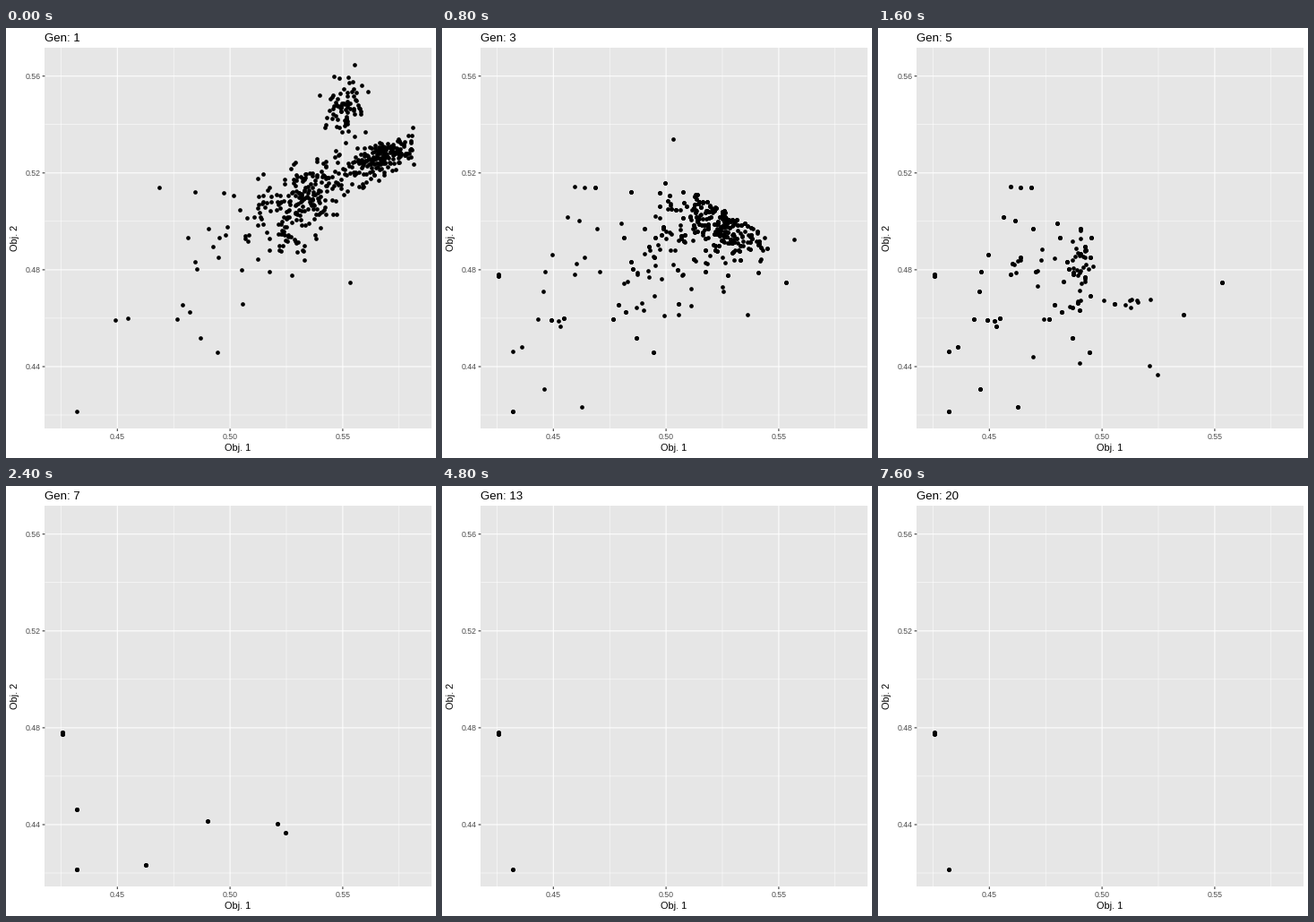
A matplotlib script that plays this animation: 480x480 px, repeating every 8000 ms.

```python
import matplotlib.pyplot as plt
import numpy as np
from matplotlib.animation import FuncAnimation
from matplotlib.patches import Rectangle

SIZE, DPI = 480, 72  # at 72 dpi one point is one pixel
GENERATIONS, INTERVAL = 20, 400
LEFT, RIGHT, TOP, BOTTOM = 43.4, 474.5, 21.8, 447.3
MIN_X, MAX_X, MIN_Y, MAX_Y = 63, 455, 41, 428
FOREVER = 99

plt.rcParams["font.family"] = "Liberation Sans"
rng = np.random.default_rng(7)


def cloud(born, last, count, center, spread, tilt=0.0):
    """Normal scatter around a tilted line, kept inside the data range."""
    dx = rng.normal(0, spread[0], count)
    x = center[0] + dx
    y = center[1] + tilt * dx + rng.normal(0, spread[1], count)
    inside = (x > MIN_X) & (x < MAX_X) & (y > MIN_Y) & (y < MAX_Y)
    return born, last, np.column_stack([x, y])[inside]


def key_points(born, last, *points):
    return born, last, np.array(points, float)


CLOUDS = [
    # first generation
    cloud(1, 1, 75, (380, 90), (12, 17)),
    cloud(1, 1, 190, (422, 144), (20, 9), -0.25),
    cloud(1, 4, 220, (335, 187), (32, 21), -0.4),
    cloud(1, 4, 25, (312, 242), (20, 17)),
    cloud(1, 5, 16, (232, 255), (20, 45), -0.8),
    # offspring moving towards the lower left
    cloud(2, 4, 110, (320, 210), (32, 20), 0.2),
    cloud(3, 4, 70, (320, 222), (25, 12), 0.4),
    cloud(3, 4, 50, (275, 240), (26, 30)),
    cloud(3, 6, 18, (135, 265), (32, 42), -0.6),
    cloud(3, 5, 10, (226, 275), (7, 25)),
    cloud(5, 5, 28, (226, 277), (7, 25)),
    cloud(5, 5, 12, (175, 280), (25, 40)),
    cloud(5, 5, 9, (278, 306), (18, 7)),
]

# Extremes and long-lived individuals on the front.
KEYS = [
    key_points(1, 1, (389, MIN_Y), (MAX_X, 152)),
    key_points(1, 5, (171, 178), (384, 284)),
    key_points(1, 6, (122, 326), (136, 324), (217, 346)),
    key_points(1, FOREVER, (79, MAX_Y)),
    key_points(2, FOREVER, (MIN_X, 276.6), (MIN_X, 275.4)),
    key_points(3, 3, (258, 124), (393, 236)),
    key_points(3, 5, (341, 320)),
    key_points(3, 8, (79, 361), (156, 423)),
    key_points(5, 7, (225, 374), (303, 377), (312, 387)),
]


def survivors(points, gen):
    """The selection line sinks and steepens with every generation."""
    if gen == 1:
        return points
    x, y = points.T
    step = gen - 2
    return points[y > 140 + 40 * step + (0.45 + 0.15 * step) * (x - 275)]


def copies(gen, born):
    """Clones pile up with age, then thin out once the run has converged."""
    return 3 if gen > 10 else min(gen - born + 1, 8)


def population(gen):
    parts = []
    for group in (CLOUDS, KEYS):
        for born, last, points in group:
            if born <= gen <= last:
                alive = survivors(points, gen) if group is CLOUDS else points
                parts.append(np.repeat(alive, copies(gen, born), axis=0))
    return np.vstack(parts)


fig = plt.figure(figsize=(SIZE / DPI, SIZE / DPI), dpi=DPI, facecolor="white")
ax = fig.add_axes([0, 0, 1, 1])
ax.set_xlim(0, SIZE)
ax.set_ylim(SIZE, 0)
ax.axis("off")
ax.add_patch(Rectangle((LEFT, TOP), RIGHT - LEFT, BOTTOM - TOP,
                       facecolor="#e6e6e6", linewidth=0, zorder=0))


def line(xs, ys, color, width, zorder):
    ax.plot(xs, ys, color=color, linewidth=width, solid_capstyle="butt",
            snap=False, zorder=zorder)


def grid_x(x, width, zorder):
    line([x, x], [TOP, BOTTOM], "white", width, zorder)


def grid_y(y, width, zorder):
    line([LEFT, RIGHT], [y, y], "white", width, zorder)


def tick_label(x, y, value, align):
    ax.text(x, y, f"{value:.2f}", size=8.8, color="#4d4d4d",
            ha=align, va="baseline")


for i in range(4):
    grid_x(61.4 + 125.8 * i, 0.53, 1)
    grid_y(107.7 + 108.1 * i, 0.53, 1)

for i in range(3):
    x = 124.3 + 125.8 * i
    grid_x(x, 1.07, 2)
    line([x, x], [BOTTOM, BOTTOM + 2.75], "#333333", 1.07, 2)
    tick_label(x, 459, 0.45 + 0.05 * i, "center")

for i in range(4):
    y = 53.7 + 108.1 * i
    grid_y(y, 1.07, 2)
    line([LEFT - 2.75, LEFT], [y, y], "#333333", 1.07, 2)
    tick_label(38.4, y + 3.2, 0.56 - 0.04 * i, "right")

ax.text((LEFT + RIGHT) / 2, 472, "Obj. 1", size=11, ha="center", va="baseline")
ax.text(13.4, (TOP + BOTTOM) / 2, "Obj. 2", size=11, rotation=90,
        ha="center", va="baseline", rotation_mode="anchor")
title = ax.text(LEFT, 15, "", size=13.2, ha="left", va="baseline")
dots = ax.scatter([], [], s=4.7 ** 2, color="black", linewidths=0,
                  snap=False, zorder=3)


def update(frame):
    gen = frame + 1
    title.set_text(f"Gen: {gen}")
    dots.set_offsets(population(gen))
    return title, dots


anim = FuncAnimation(fig, update, frames=GENERATIONS, interval=INTERVAL,
                     repeat=True, repeat_delay=0)
plt.show()
```
